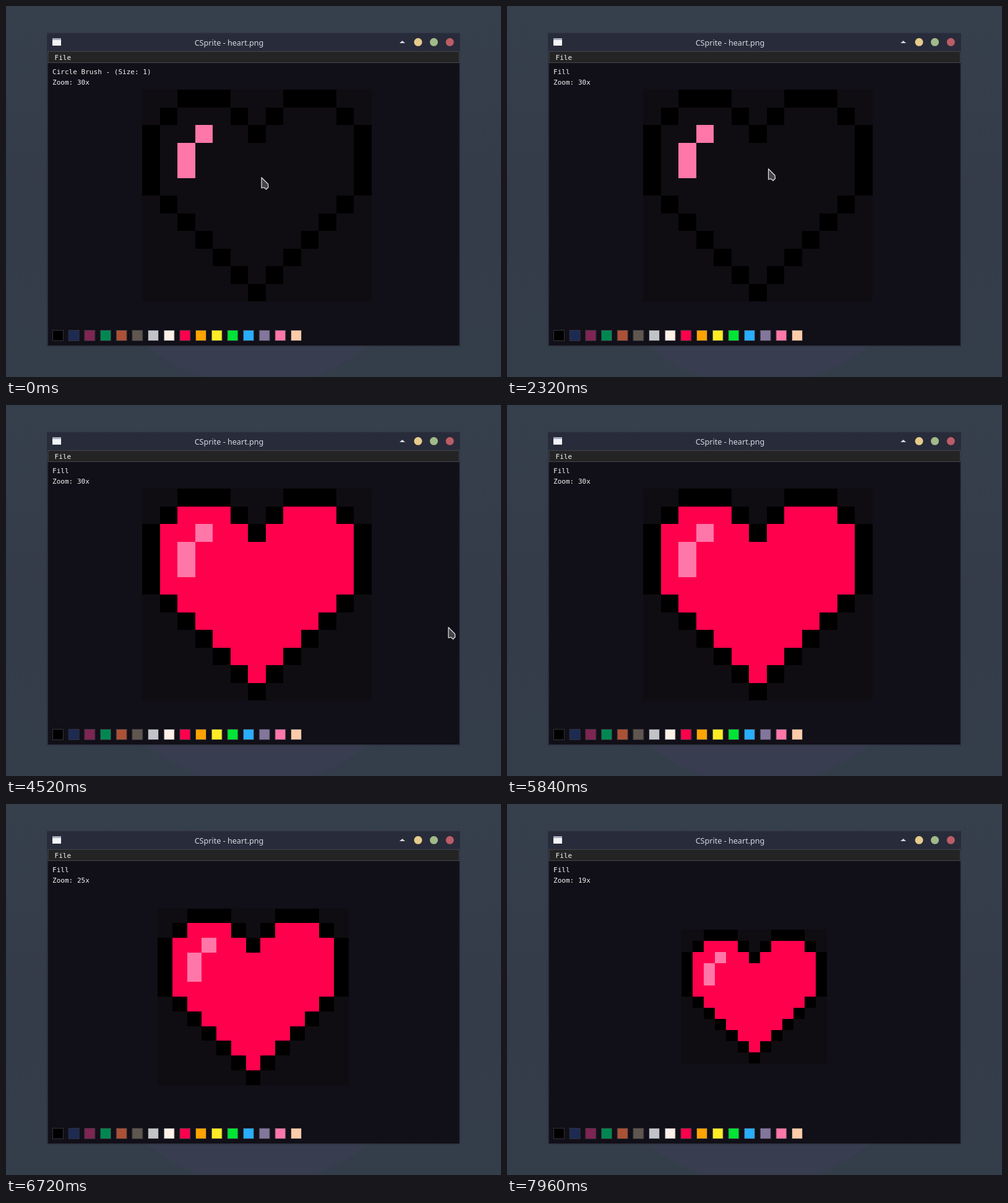
Write an HTML page that moves like this. It is 800 px wide and 599 px high and loops after 8000 ms.

```html
<!DOCTYPE html>
<html lang="en">
<head>
<meta charset="utf-8">
<title>Pixel editor</title>
<style>
html, body { margin: 0; width: 100%; height: 100%; overflow: hidden; background: #343d4a; }
svg { display: block; }
.mono { font: 11.05px "DejaVu Sans Mono", monospace; fill: #f4f4f4; white-space: pre; }
.title { font: 12.6px "Noto Sans", sans-serif; fill: #d5dae3; }
</style>
</head>
<body>
<svg width="800" height="599" viewBox="0 0 800 599">
  <defs>
    <linearGradient id="sky" x2="0" y2="1">
      <stop offset="0" stop-color="#36404c"/>
      <stop offset=".5" stop-color="#343b49"/>
      <stop offset="1" stop-color="#343e4a"/>
    </linearGradient>
  </defs>
  <rect width="800" height="599" fill="url(#sky)"/>
  <circle cx="406" cy="332" r="281" fill="#383e4f"/>

  <rect x="66" y="43.5" width="668" height="506" fill="#2a2f3d"/>
  <rect x="67" y="45" width="666" height="29" fill="#282b39"/>
  <rect x="68" y="74" width="664.5" height="474" fill="#110f17"/>
  <rect x="68" y="73.5" width="664.5" height="18" fill="#242424" stroke="#45454c"/>
  <rect x="75" y="52" width="14" height="12" fill="#f3f4f6"/>
  <rect x="75" y="52" width="14" height="3" fill="#a9b1bf"/>
  <text class="title" x="360.5" y="63.5" text-anchor="middle">CSprite - heart.png</text>
  <path d="M636 60l4.5-4 4.5 4z" fill="#d5dae3"/>
  <circle cx="666" cy="58.3" r="6.5" fill="#e6cb8c"/>
  <circle cx="691.5" cy="58.3" r="6.5" fill="#a0ba8a"/>
  <circle cx="717.3" cy="58.3" r="6.5" fill="#bb5d67"/>

  <text class="mono" x="78.5" y="87">File</text>
  <g id="art" shape-rendering="crispEdges">
    <rect width="13" height="12" fill="#0f0d11"/>
    <path id="ink"/>
    <path id="fill" fill="#ff004d"/>
    <path id="shine" fill="#ff77a8"/>
  </g>
  <text class="mono" id="tool" x="75" y="110"></text>
  <text class="mono" id="zoom" x="75" y="127"></text>
  <g id="palette" stroke="#33323b"></g>
  <path id="cursor" d="M1 1V18L5 17L8.5 20L12 16.5L11.5 11.5Z" fill="#454548" stroke="#e4e4e4" stroke-width="1.2" stroke-linejoin="round"/>
</svg>
<script>
const $ = id => document.getElementById(id);
const LOOP = 8000, STEP = 40;

// # outline, o body, * highlight
const heart = [
  "  ###   ###  ",
  " #ooo# #ooo# ",
  "#oo*oo#ooooo#",
  "#o*ooooooooo#",
  "#o*ooooooooo#",
  "#ooooooooooo#",
  " #ooooooooo# ",
  "  #ooooooo#  ",
  "   #ooooo#   ",
  "    #ooo#    ",
  "     #o#     ",
  "      #      "
];
const cells = mark => heart.map((row, y) =>
  [...row].map((c, x) => c === mark ? `M${x} ${y}h1v1h-1z` : "").join("")).join("");
$("ink").setAttribute("d", cells("#"));
$("fill").setAttribute("d", cells("o"));
$("shine").setAttribute("d", cells("*"));

const colors = ("000000 1d2b53 7e2553 008751 ab5236 5f574f c2c3c7 fff1e8 " +
  "ff004d ffa300 ffec27 00e436 29adff 83769c ff77a8 ffccaa").split(" ");
$("palette").innerHTML = colors.map((c, i) =>
  `<rect x="${75.5 + i * 25.67}" y="523.5" width="17" height="17" fill="#${c}"/>`).join("");

// Cursor stops: time, x, y
const path = [[2080, 412, 276], [2320, 421.5, 262], [3080, 421.5, 262],
  [3200, 438, 266], [4080, 438, 266], [4520, 714, 358], [4680, 814, 391]];

function cursorAt(t) {
  const next = path.findIndex(p => p[0] > t);
  if (next < 0) return path[path.length - 1].slice(1);
  if (next === 0) return path[0].slice(1);
  const a = path[next - 1], b = path[next], k = (t - a[0]) / (b[0] - a[0]);
  return [a[1] + (b[1] - a[1]) * k, a[2] + (b[2] - a[2]) * k];
}

function draw(now) {
  const t = Math.floor(now % LOOP / STEP) * STEP;
  const zoom = t < 5920 ? 30 : 29 - Math.floor((t - 5920) / 200);
  const [cx, cy] = zoom === 30 ? [405.7, 306] : [399.6, 311];
  const size = zoom * 0.95;
  $("art").setAttribute("transform",
    `translate(${cx - size * 6.5} ${cy - size * 6}) scale(${size})`);
  $("fill").style.display = t < 2720 ? "none" : "";
  $("tool").textContent = t < 720 ? "Circle Brush - (Size: 1)" : "Fill";
  $("zoom").textContent = `Zoom: ${zoom}x`;
  $("cursor").setAttribute("transform", `translate(${cursorAt(t)})`);
  requestAnimationFrame(draw);
}
requestAnimationFrame(draw);
</script>
</body>
</html>
```
